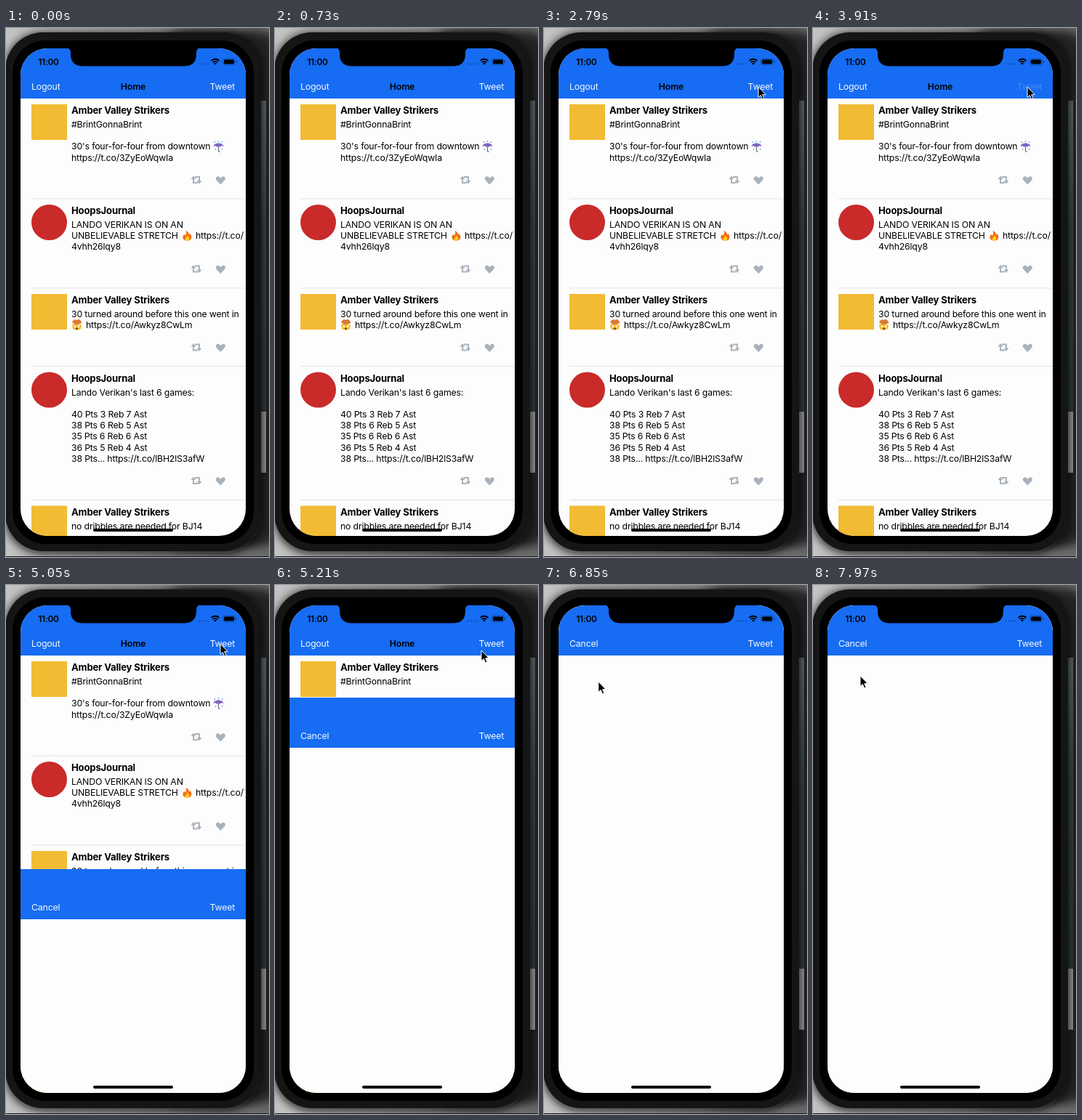
Recreate the animation shown at these times as an HTML page. Size 362x728 px, loop 7990 ms.

```html
<!DOCTYPE html>
<html lang="en">
<head>
<meta charset="utf-8">
<title>Timeline app</title>
<style>
  html, body { margin: 0; width: 100%; height: 100%; overflow: hidden; background: #000; }
  svg { display: block; width: 362px; height: 728px; }
  text { font: 12.3px Inter, Roboto, sans-serif; letter-spacing: -.17px; fill: #000; white-space: pre; }
  .name { font-size: 13.1px; font-weight: 700; }
  .title { font-weight: 600; }
  .clock { font-size: 11.8px; font-weight: 600; }
  .button { fill: #f4f9ff; }
  .bar { fill: #166cf2; }
  .paper { fill: #fdfdfd; }
</style>
</head>
<body>
<svg viewBox="0 0 362 728">
  <defs>
    <clipPath id="screen"><rect x="20" y="28" width="310" height="671" rx="37"/></clipPath>
    <filter id="soft" x="-20%" y="-10%" width="140%" height="120%"><feGaussianBlur stdDeviation="7"/></filter>
    <linearGradient id="desk">
      <stop offset="0" stop-color="#c4c4c4"/><stop offset=".5" stop-color="#a0a0a0"/><stop offset="1" stop-color="#6c6c6c"/>
    </linearGradient>
    <linearGradient id="backScreen" x2="0" y2="1">
      <stop offset="0" stop-color="#5d6a6e"/><stop offset=".4" stop-color="#39464a"/><stop offset="1" stop-color="#2f3c40"/>
    </linearGradient>

    <g id="umbrella">
      <path d="M0 7C1 1 13 1 14 7L11 6 9 8 7 6 5 8 3 6Z" fill="#7d62c4"/>
      <path d="M7 6V13Q7 15 9 14" fill="none" stroke="#6c6878" stroke-width="1.2"/>
      <path d="M2 0v2M7 -1v2M12 0v2M3 10v2M12 10v2" stroke="#63a9d8" stroke-width="1.3"/>
    </g>
    <g id="fire">
      <path d="M5 0C10 3 9 5 10 6L11 4C15 10 12 14 7 14C1 14 -1 9 3 5L4 7C6 5 6 3 5 0Z" fill="#f36b13"/>
      <path d="M7 6C8 9 10 9 10 11Q9 14 7 14Q3 13 4 10L5 11Z" fill="#ffd21c"/>
    </g>
    <g id="mindblown">
      <path d="M3 5Q-1 3 2 1Q4 -1 7 0Q11 -2 13 2Q15 5 11 5L9 7H5Z" fill="#d87938"/>
      <path d="M1 6L4 5 6 7 8 5 10 7 13 6Q15 14 7 14Q-1 14 1 6Z" fill="#f6bd32"/>
      <circle cx="4.5" cy="9" r="1.2" fill="#fff"/><circle cx="9.5" cy="9" r="1.2" fill="#fff"/>
      <ellipse cx="7" cy="12" rx="1.5" ry="1.2" fill="#603414"/>
    </g>
    <g id="actions" fill="#a9b2ba">
      <path d="M258 -3V4H264M260 -4H266V3" fill="none" stroke="#a9b2ba" stroke-width="2"/>
      <path d="M254.5 -1L258 -5.5 261.5 -1ZM262.5 1H269.5L266 5.5Z"/>
      <path d="M295.3 6.5L290 1C287 -2 290 -6 293 -4.5Q295 -4 295.3 -2Q296 -4 298 -4.5C301 -6 303.5 -2 300.5 1Z"/>
    </g>
  </defs>

  <!-- Desktop with a second device behind the phone -->
  <rect width="362" height="728" fill="url(#desk)"/>
  <rect x="200" y="3" width="190" height="712" rx="50" fill="#222" filter="url(#soft)"/>
  <rect x="351" y="100" width="7" height="428" fill="url(#backScreen)"/>
  <rect x="351" y="528" width="7" height="84" fill="#9b9b9b"/>

  <rect x="0" y="8" width="351" height="714" rx="50" fill="#111" filter="url(#soft)"/>
  <rect x="-1" y="6" width="352" height="714" rx="52" fill="#151515"/>
  <rect x="9" y="17" width="332" height="693" rx="45" fill="#000"/>
  <rect y="727" width="362" height="1" fill="#161616"/>

  <g clip-path="url(#screen)">
    <rect class="paper" x="20" y="28" width="310" height="671"/>
    <g id="feed"></g>
    <rect class="bar" x="20" y="28" width="310" height="69"/>
    <text class="button" x="35" y="85">Logout</text>
    <text class="title" x="175" y="85" text-anchor="middle">Home</text>
    <text class="button" id="compose" x="315" y="85" text-anchor="end">Tweet</text>

    <g id="sheet">
      <rect class="paper" x="20" y="28" width="310" height="680"/>
      <rect class="bar" x="20" y="28" width="310" height="69"/>
      <text class="button" x="35" y="85">Cancel</text>
      <text class="button" x="315" y="85" text-anchor="end">Tweet</text>
    </g>

    <path d="M84 27Q89 29 89 34V36Q89 52.5 106 52.5H245Q262 52.5 262 36V34Q262 29 267 27Z"/>
    <text class="clock" x="58.5" y="50.5" text-anchor="middle">11:00</text>
    <path d="M265 49.5H279" stroke="#1150b8" stroke-width="2" stroke-dasharray="2 2"/>
    <path d="M282.5 45Q288 40.5 293.5 45M284.7 47.3Q288 44.5 291.3 47.3" fill="none" stroke="#000" stroke-width="1.8"/>
    <path d="M286 48.5Q288 47 290 48.5L288 50.7Z"/>
    <rect x="298.5" y="42.2" width="17" height="8.6" rx="2.6" fill="none" stroke="#000" stroke-opacity=".35" stroke-width=".8"/>
    <rect x="300" y="43.5" width="14" height="6" rx="1.5"/>
    <rect x="316.5" y="45" width="1.2" height="3" rx=".6" fill-opacity=".4"/>
    <rect x="120" y="689" width="110" height="4" rx="2"/>
  </g>

  <path id="cursor" d="M0 0V14.5L3.3 11.5 5.6 17 8 16 5.7 10.7H10.3Z" fill="#000" stroke="#fff"/>
</svg>

<script>
const LOOP = 7990;
const $ = id => document.getElementById(id);

const TEAM = { name: "Amber Valley Strikers", avatar: y => `<rect x="35" y="${y}" width="49" height="49" fill="#f2bb34"/>` };
const SHOW = { name: "HoopsJournal", avatar: y => `<circle cx="59.5" cy="${y + 24.5}" r="24.5" fill="#c92a2a"/>` };

// Each post: top edge, author, text lines, action row centre, emoji [id, x, line], link [x, line, text]
const posts = [
  { top: 97, by: TEAM, actions: 209, emoji: ["umbrella", 285.5, 2],
    lines: ["#BrintGonnaBrint", "", "30's four-for-four from downtown", "https://t.co/3ZyEoWqwIa"] },
  { top: 235, by: SHOW, actions: 331.5, emoji: ["fire", 242.5, 1],
    lines: ["LANDO VERIKAN IS ON AN", "UNBELIEVABLE STRETCH", "4vhh26lqy8"], link: [261, 1, "https://t.co/"] },
  { top: 358, by: TEAM, actions: 439.5, emoji: ["mindblown", 90.5, 1],
    lines: ["30 turned around before this one went in"], link: [110, 1, "https://t.co/Awkyz8CwLm"] },
  { top: 465.5, by: SHOW, actions: 623,
    lines: ["Lando Verikan's last 6 games:", "", "40 Pts 3 Reb 7 Ast", "38 Pts 6 Reb 5 Ast",
      "35 Pts 6 Reb 6 Ast", "36 Pts 5 Reb 4 Ast", "38 Pts... https://t.co/lBH2lS3afW"] },
  { top: 649.5, by: TEAM, lines: ["no dribbles are needed for BJ14"] }
];

$("feed").innerHTML = posts.map(({ top, by, lines, link, emoji, actions }) => {
  const lineY = i => top + 40 + i * 15.2;
  const text = (x, y, s, kind = "") => `<text class="${kind}" x="${x}" y="${y}">${s}</text>`;
  let out = `<path d="M35 ${top}H330" stroke="#dcdcde" stroke-width=".8"/>`;
  out += by.avatar(top + 8) + text(90, top + 21, by.name, "name");
  out += lines.map((s, i) => text(90, lineY(i), s)).join("");
  if (link) out += text(link[0], lineY(link[1]), link[2]);
  if (emoji) out += `<use href="#${emoji[0]}" x="${emoji[1]}" y="${lineY(emoji[2]) - 11.5}"/>`;
  if (actions) out += `<use href="#actions" y="${actions}"/>`;
  return out;
}).join("");

// Cursor tip: time, x, y
const path = [
  [1380, 262, -20], [1710, 241, 59], [2350, 290, 84], [2600, 295, 81], [5070, 295, 81],
  [5210, 284, 90], [5910, 128, 158], [6600, 76, 135], [7450, 72, 128], [7700, 65, 125], [LOOP, 65, 125]
];

function cursorAt(t) {
  const i = Math.max(1, path.findIndex(p => p[0] >= t));
  const [a, b] = [path[i - 1], path[i]];
  const k = Math.max(0, (t - a[0]) / (b[0] - a[0]));
  return [a[1] + (b[1] - a[1]) * k, a[2] + (b[2] - a[2]) * k];
}

function recordedStep(t) {
  const group = Math.floor((t - 130) / 140);
  const phase = t - 130 - group * 140;
  const sub = phase < 20 ? 0 : phase < 40 ? 1 : 2;
  return { index: group * 3 + sub, time: Math.max(0, 130 + group * 140 + sub * 20) };
}

function draw(now) {
  const { index, time } = recordedStep(now % LOOP);
  const offset = index < 104 ? 700 : 363 * Math.exp(-0.2626 * (index - 106));
  $("sheet").setAttribute("transform", `translate(0 ${offset < 0.3 ? 0 : offset})`);
  $("compose").setAttribute("opacity", time >= 3800 && time < 4850 ? 0.2 : 1);
  $("cursor").setAttribute("transform", `translate(${cursorAt(time)})`);
  requestAnimationFrame(draw);
}
requestAnimationFrame(draw);
</script>
</body>
</html>
```
